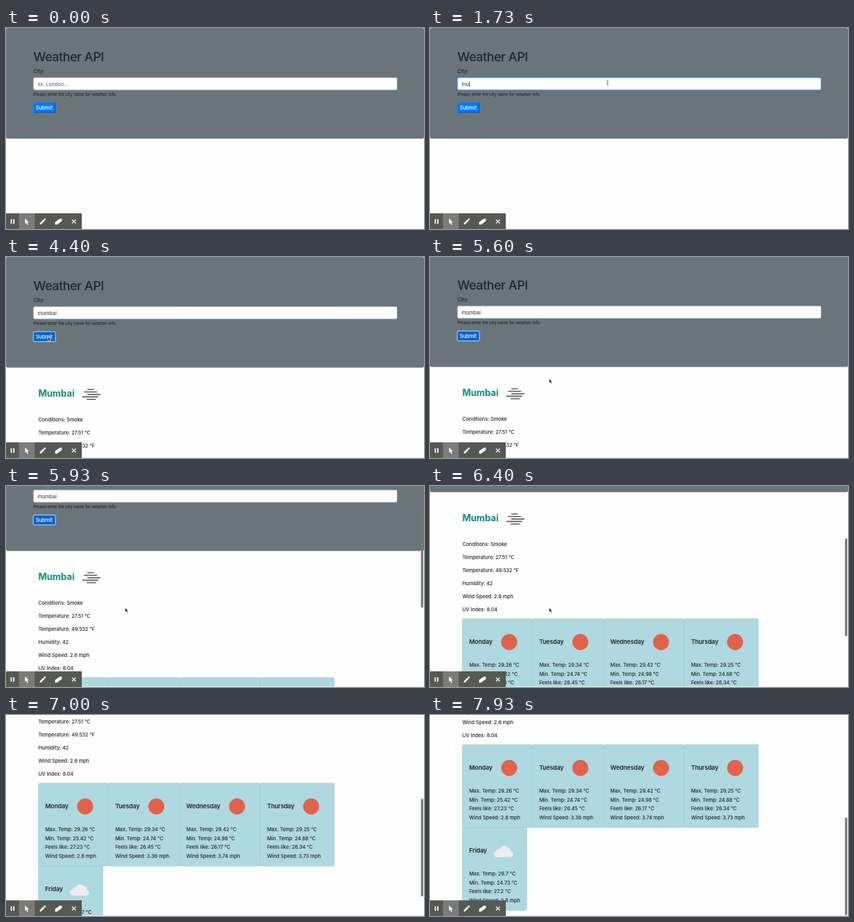
These frames come from a looping animation (640 px wide and 308 px high, 8000 ms). An HTML page:

```html
<!DOCTYPE html>
<html lang="en">
<head>
<meta charset="utf-8">
<title>Weather API</title>
<style>
  html, body { margin: 0; width: 100%; height: 100%; overflow: hidden; background: #fefefe; }
  svg { display: block; width: 640px; height: 308px; }
  text { font: 500 7.7px Inter, "Open Sans", sans-serif; font-optical-sizing: none; letter-spacing: -.04px; fill: #212529; }
  .title { font-size: 19px; letter-spacing: -.45px; }
  .help { font-size: 6.2px; letter-spacing: -.03px; }
  .city { font-size: 14.1px; font-weight: 700; fill: #118a7b; }
  .day { font-size: 9.3px; font-weight: 600; letter-spacing: -.11px; }
  .card { fill: #aed9e0; stroke: #9cc8cf; stroke-width: .6; }
</style>
</head>
<body>
<svg viewBox="0 0 640 308">
  <g id="page">
    <rect width="640" height="169.4" rx="2.4" fill="#69757b"/>
    <text class="title" x="42" y="51.3">Weather API</text>
    <text x="42" y="69">City:</text>
    <rect id="glow" x="40.6" y="74.6" width="559" height="21.8" rx="3" fill="#007bff" fill-opacity=".25"/>
    <rect id="input" x="42.2" y="76.2" width="556.4" height="18.6" rx="2" fill="#fefefe" stroke-width=".8"/>
    <text id="value" x="48.4" y="88.5"></text>
    <rect id="caret" y="81.5" width=".7" height="8.5" fill="#222"/>
    <text class="help" x="42" y="104">Please enter the city name for weather info:</text>
    <rect id="face" x="42" y="114.5" width="33.6" height="15"/>
    <path id="bevel" d="M42 129.1H75.2V114.5" fill="none" stroke="#0b4c93" stroke-width=".9"/>
    <rect id="ring" x="41.9" y="114.4" width="33.9" height="15.3" rx="1" fill="none" stroke="#d8e8fb" stroke-width=".9"/>
    <text x="45.8" y="125" style="fill:#fff">Submit</text>
    <g id="results">
      <text class="city" x="49.4" y="214">Mumbai</text>
      <path d="M125 203h9M120 206.8h19M125 210.6h19M117.5 214.4h23M124 218.2h13" stroke="#555" stroke-width="1.6" stroke-linecap="round"/>
      <g id="now"></g>
      <g id="cards"></g>
    </g>
  </g>
  <path d="M116 307.5H640" stroke="#ececec"/>
  <rect id="thumb" x="635.4" width="3.4" height="150" rx="1.7" fill="#777"/>
  <g fill="#fff">
    <rect y="284" width="116" height="24" fill="#565854"/>
    <rect x="20" y="284" width="24" height="24" fill="#7b7c79"/>
    <path d="M7.2 293h1.9v7h-1.9zM11 293h1.9v7h-1.9z"/>
    <path d="M29.2 291.8V300l1.9-1.6 1.5 3.3 1.4-.6-1.5-3.2h2.6z"/>
    <path d="M51.8 301v-2l5.4-5.4 2 2-5.4 5.4zM57.8 293l1-1q.5-.4 1 0l1 1q.4.5 0 1l-1 1z"/>
    <path d="M75.2 297.2l7.3-5h3v3.6l-7.3 5.5h-3z"/>
    <path d="M101 293.5l6 6M107 293.5l-6 6" stroke="#fff" stroke-width="1.2"/>
  </g>
  <path id="arrow" d="M0 0V6.8l1.6-1.4 1.1 2.4 1.2-.5-1.1-2.4h2.1z" fill="#222" stroke="#fff" stroke-width=".6"/>
  <path id="beam" d="M-1.5-3.5Q0-3.5 0-2.6 0-3.5 1.5-3.5M0-2.6V2.6M-1.5 3.5Q0 3.5 0 2.6 0 3.5 1.5 3.5M-.8.9H.8" fill="none" stroke="#444" stroke-width=".7"/>
</svg>
<script>
const $ = id => document.getElementById(id);
const LOOP = 8000, STEP = 200 / 3;
const text = (x, y, s, cls = "") => `<text class="${cls}" x="${x}" y="${y}">${s}</text>`;
const lines = (x, y, gap, list) => list.map((s, i) => text(x, y + gap * i, s)).join("");

$("now").innerHTML = lines(49.4, 252.3, 20, ["Conditions: Smoke", "Temperature: 27.51 °C",
  "Temperature: 49.532 °F", "Humidity: 42", "Wind Speed: 2.6 mph", "UV Index: 8.04"]);

const sun = '<circle r="12.3" fill="#e2624b"/>';
const cloud = '<path d="M-10.5 9.6a4.6 4.6 0 0 1-.6-9.1A5 5 0 0 1-5.6-3.2 6.8 6.8 0 0 1 6.6-4.6 5 5 0 0 1 11.2 1a4.4 4.4 0 0 1-.4 8.6z" fill="#eee"/>';
const forecast = [
  ["Monday", sun, "29.26", "25.42", "27.23", "2.6"],
  ["Tuesday", sun, "29.34", "24.74", "26.45", "3.36"],
  ["Wednesday", sun, "29.42", "24.98", "26.17", "3.74"],
  ["Thursday", sun, "29.25", "24.88", "26.34", "3.73"],
  ["Friday", cloud, "29.7", "24.73", "27.2", "2.8"]
];

// each card is as wide as its heading and icon; a full row wraps
const LEFT = 49.5, RIGHT = 598, CARD = 127;
let cardX = LEFT, cardY = 363.5;
for (const [day, icon, max, min, feels, wind] of forecast) {
  const g = document.createElementNS("http://www.w3.org/2000/svg", "g");
  $("cards").append(g);
  g.innerHTML = text(0, 0, day, "day");
  const w = g.firstChild.getComputedTextLength() + 71.5;
  if (cardX + w > RIGHT) {
    cardX = LEFT;
    cardY += CARD;
  }
  g.setAttribute("transform", `translate(${cardX} ${cardY})`);
  g.innerHTML = `<rect class="card" width="${w}" height="${CARD}" rx="2"/>` +
    text(10.4, 38, day, "day") +
    `<g transform="translate(${w - 35.5} 35.6)">${icon}</g>` +
    lines(10.4, 73.9, 13.5, [`Max. Temp: ${max} °C`, `Min. Temp: ${min} °C`,
      `Feels like: ${feels} °C`, `Wind Speed: ${wind} mph`]);
  cardX += w;
}

const CITY = "mumbai", FOCUS = 730, TYPE = 1260, KEY = 270, CLICK = 3860, LOADED = 4260;
const SCROLL = 5460, POINTER_GONE = 6700;
// time, x, y
const path = [[200, 246, 130], [600, 272, 84], [2700, 272, 84], [3660, 64, 122], [4600, 64, 122], [5400, 182.5, 186.5]];

const clamp = u => Math.min(1, Math.max(0, u));
const smooth = u => u * u * (3 - 2 * u);

function pointer(t) {
  const i = Math.max(1, path.findLastIndex(p => t >= p[0]) + 1);
  const a = path[i - 1], b = path[i] || a;
  const u = smooth(clamp((t - a[0]) / (b[0] - a[0] || 1)));
  return [a[1] + (b[1] - a[1]) * u, a[2] + (b[2] - a[2]) * u];
}

const scrollAt = t => t < SCROLL ? 0 : Math.round(1 + 317 * (1 - (1 - clamp((t - 5600) / 1920)) ** 1.29));
const show = (id, on) => $(id).setAttribute("visibility", on ? "visible" : "hidden");
const move = (id, x, y) => $(id).setAttribute("transform", `translate(${x} ${y})`);

function draw(t) {
  const scroll = scrollAt(t);
  move("page", 0, -scroll);
  show("thumb", scroll > 1);
  $("thumb").setAttribute("y", 2.4 + scroll * .486);

  const focused = t >= FOCUS && t < CLICK;
  show("glow", focused);
  $("input").setAttribute("stroke", focused ? "#6fadf0" : "#ced4da");

  const count = Math.min(CITY.length, Math.max(0, Math.floor((t - TYPE) / KEY) + 1));
  const value = $("value");
  value.textContent = count ? CITY.slice(0, count) : "ex. London...";
  value.style.fill = count ? "#495057" : "#6c757d";
  const lastKey = count ? TYPE + KEY * (count - 1) : FOCUS;
  show("caret", focused && (t - lastKey) % 1000 < 500);
  $("caret").setAttribute("x", count ? 48.6 + value.getComputedTextLength() : 48.4);

  const [x, y] = pointer(t);
  const visible = t >= path[0][0] && t < POINTER_GONE;
  const inField = y > 76 && y < 95;
  show("arrow", visible && !inField);
  show("beam", visible && inField);
  move("arrow", x, y);
  move("beam", x, y);

  const clicked = t >= CLICK;
  const hover = x > 42 && x < 75.6 && y > 114.5 && y < 129.5;
  $("face").setAttribute("fill", hover || clicked ? "#0065d0" : "#007bff");
  show("ring", clicked);
  show("bevel", !clicked);
  show("results", t >= LOADED);
}

// the picture advances 15 times a second
function frame(now) {
  draw(Math.floor((now % LOOP + 5) / STEP) * STEP);
  requestAnimationFrame(frame);
}
requestAnimationFrame(frame);
</script>
</body>
</html>
```
